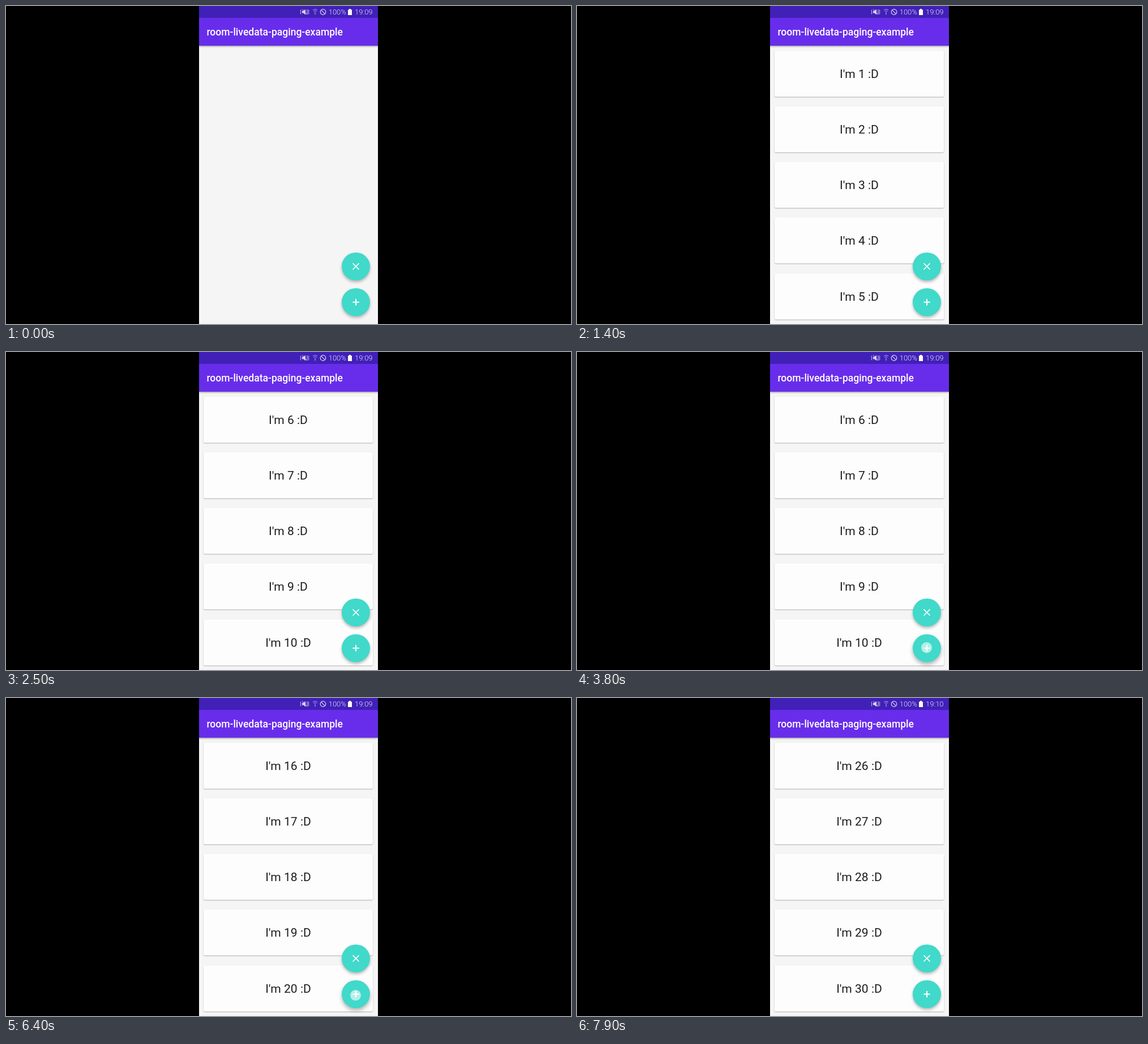
An HTML page for the animation above (8000 ms loop, 998 by 561 pixels).

```html
<!DOCTYPE html>
<html lang="en">
<head>
<meta charset="utf-8">
<title>Paging list</title>
<style>
  html, body { margin: 0; width: 100%; height: 100%; overflow: hidden; background: #000; }
  body { position: relative; font-family: Roboto, sans-serif; }
  #phone { position: absolute; left: 341px; top: 0; width: 315.6px; height: 561px; overflow: hidden; background: #f5f5f5; }
  #status { position: absolute; width: 100%; height: 21px; background: #4020b7; z-index: 3; }
  #bar {
    position: absolute; top: 21px; width: 100%; height: 49px; z-index: 2;
    background: #682deb; box-shadow: 0 1px 3px rgba(0, 0, 0, .45);
    color: #fff; font-size: 17.56px; font-weight: 500; line-height: 50px;
    text-indent: 13.5px; white-space: nowrap;
  }
  #list { position: absolute; top: 70px; left: 0; width: 100%; will-change: transform; }
  .card {
    position: absolute; left: 8px; width: 299px; height: 81px; border-radius: 2.5px;
    font-size: 21.07px; line-height: 82px; text-align: center; color: #1c1c1c;
  }
  #thumb { position: absolute; right: 0; width: 3.5px; background: #b9b9b9; z-index: 1; }
  svg { position: absolute; left: 0; top: 0; z-index: 4; }
  .fab {
    position: absolute; left: 252.4px; width: 49.2px; height: 49.2px; border-radius: 50%;
    background: #41d9ca; box-shadow: 0 3px 5px rgba(0, 0, 0, .27); z-index: 2; overflow: hidden;
  }
  #clear { top: 434.7px; }
  #add { top: 497.9px; }
  #ripple { position: absolute; border-radius: 50%; background: #fff; }
</style>
</head>
<body>
<div id="phone">
  <div id="status"></div>
  <div id="bar">room-livedata-paging-example</div>
  <div id="list"></div>
  <div id="thumb"></div>
  <div id="clear" class="fab"></div>
  <div id="add" class="fab"><div id="ripple"></div></div>
  <svg width="316" height="561" viewBox="341 0 316 561" fill="none" stroke="#fff">
    <g stroke="#d9d2f1">
      <path d="M523 8.5h2.5l3.5-3v10l-3.5-3H523z" fill="#d9d2f1" stroke="none"/>
      <path d="M523.5 5.5l8 9.5M521 6.5l-1 2 1 2-1 2 1 2M532 6v9M534 6.5l1 2-1 2 1 2-1 2"/>
      <path d="M542 7.2q4-3 8 0M543.5 9.6q2.500-2 5 0M545 12q1-.8 2 0M546 12v3.500" stroke-opacity=".75"/>
      <circle cx="560" cy="10.500" r="4.800" stroke-width="1.200"/>
      <path d="M556.700 7.200l6.600 6.600" stroke-width="1.200"/>
      <path d="M604 6.500h2V5h3v1.500h2V16h-7z" fill="#fff" stroke="none"/>
    </g>
    <g fill="#e6e0f7" stroke="none" font-family="Roboto, sans-serif" font-size="13" font-weight="300">
      <text x="569.700" y="15.300">100%</text>
      <text id="clock" x="616" y="15.300">19:09</text>
    </g>
    <path d="M612.500 453.900l11 11m0-11l-11 11" stroke-width="1.500"/>
    <path d="M612.300 522.500h11.400M618 516.800v11.400" stroke-width="2"/>
  </svg>
</div>
<script>
const LOOP = 8000, STEP = 100, PITCH = 98.2, VIEW = 491;
const $ = id => document.getElementById(id);
const clamp = v => Math.min(1, Math.max(0, v));

// Each tap adds ten rows, then the list scrolls to its end.
const taps = [
  { at: 700, x: 24.6, y: 24, start: 1502, dur: 400 },
  { at: 3800, x: 24.6, y: 23.2, start: 4243, dur: 500 },
  { at: 6400, x: 24.1, y: 26.2, start: 6743, dur: 500 }
];

const cards = Array.from({ length: 30 }, (_, i) => {
  const el = document.createElement('div');
  const label = document.createElement('span');
  el.className = 'card';
  el.style.top = 8.8 + PITCH * i + 'px';
  label.textContent = `I'm ${i + 1} :D`;
  el.append(label);
  $('list').append(el);
  return { el, label, born: i < 2 ? 1180 : i < 10 ? 1270 : taps[Math.floor(i / 10)].at };
});

function drawCard({ el, label, born }, t) {
  const a = clamp((t - born) / 120);
  const v = Math.round(239 + 14 * clamp((a - .17) / .83));
  el.style.visibility = a ? 'visible' : 'hidden';
  el.style.background = `rgb(${v},${v},${v})`;
  el.style.boxShadow = `0 1px 2px rgba(0,0,0,${.28 * a * a})`;
  label.style.opacity = a;
}

function drawScroll(t) {
  let pos = 0, rows = 10, alpha = 0;
  taps.forEach(({ start, dur }, i) => {
    if (t < start) return;
    const end = start + dur;
    const left = (1 - clamp((t - start) / dur)) ** 2;
    rows = 10 * (i + 1);
    const goal = rows * PITCH - VIEW;
    pos += (goal - pos) * (1 - left);
    alpha = 1 - clamp((t - end - 350) / 250);
  });
  const ratio = VIEW / (rows * PITCH);
  $('list').style.transform = `translateY(${-Math.round(pos)}px)`;
  $('thumb').style.top = 70 + pos * ratio + 'px';
  $('thumb').style.height = VIEW * ratio + 'px';
  $('thumb').style.opacity = alpha;
}

function drawRipple(t) {
  const tap = taps.find(({ at }) => t >= at && t < at + 560);
  const s = $('ripple').style;
  s.opacity = 0;
  $('add').style.boxShadow = tap ? '0 4px 7px rgba(0,0,0,.3)' : '';
  if (!tap) return;
  const age = t - tap.at, r = Math.min(9.5 + age * .08, 52);
  s.left = tap.x - r + 'px';
  s.top = tap.y - r + 'px';
  s.width = s.height = 2 * r + 'px';
  s.opacity = .6 * (1 - age / 560);
}

function frame() {
  const t = Math.floor(performance.now() % LOOP / STEP) * STEP;
  cards.forEach(c => drawCard(c, t));
  drawScroll(t);
  drawRipple(t);
  $('clock').textContent = t < 7000 ? '19:09' : '19:10';
  requestAnimationFrame(frame);
}
frame();
</script>
</body>
</html>
```
